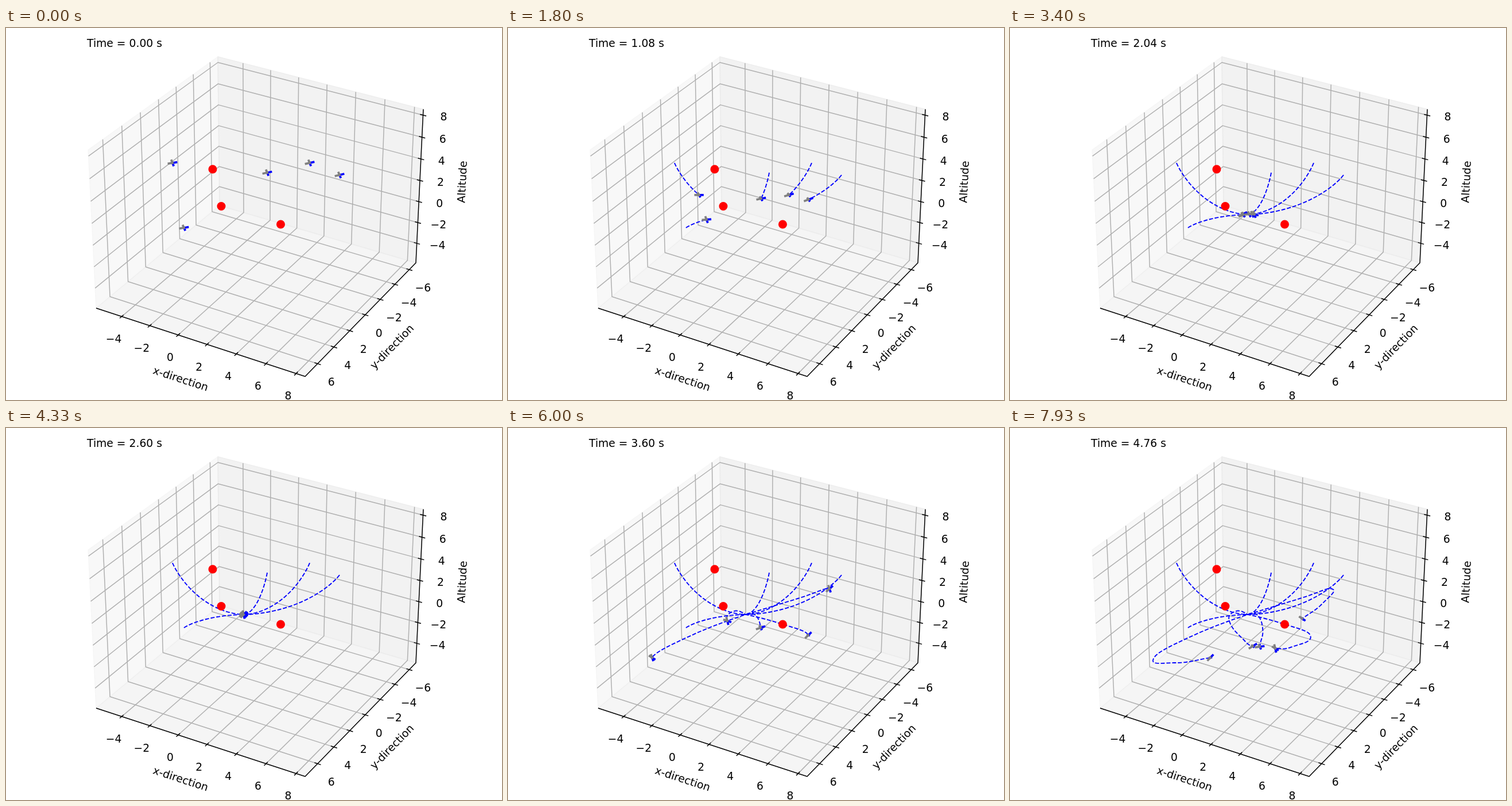
Write an HTML page with a canvas that moves like this. It is 864x648 px and loops after 8000 ms.

```html
<!DOCTYPE html>
<html>
<head>
<meta charset="utf-8">
<style>
html, body { margin: 0; width: 100%; height: 100%; overflow: hidden; background: #fff; }
canvas { display: block; }
</style>
</head>
<body>
<canvas id="stage" width="864" height="648"></canvas>
<script>
const ctx = document.getElementById('stage').getContext('2d');
const FONT = '18.75px "DejaVu Sans", sans-serif';
const LOOP = 8000, FRAMES = 120, STEP = 0.04;

// Perspective box: u along x, v along y, w along altitude, each 0..1.
// Corners are homogeneous: [x, y, weight].
const corner = (x, y, k) => [x * k, y * k, k];
const O = corner(372, 309.2, 1), U = corner(714, 409, 0.954),
      V = corner(157, 488, 0.915), W = corner(369, 50, 0.957);

function project([u, v, w]) {
  const [x, y, k] = O.map((o, i) => o + u * (U[i] - o) + v * (V[i] - o) + w * (W[i] - o));
  return [x / k, y / k];
}

function path(points) {
  ctx.beginPath();
  points.forEach(p => ctx.lineTo(p[0], p[1]));
}

function line(points, color, width) {
  path(points);
  ctx.strokeStyle = color;
  ctx.lineWidth = width;
  ctx.stroke();
}

const box = points => points.map(project);

function pane(points, color) {
  path(box(points));
  ctx.closePath();
  ctx.fillStyle = ctx.strokeStyle = color;
  ctx.lineWidth = 1.5;
  ctx.fill();
  ctx.stroke();
}

function label(text, x, y, degrees = 0, drop = 6.9) {
  ctx.save();
  ctx.translate(x, y);
  ctx.rotate(degrees * Math.PI / 180);
  ctx.textAlign = 'center';
  ctx.fillStyle = '#000';
  ctx.fillText(text, 0, drop);
  ctx.restore();
}

const axes = [
  { first: -4, start: 0.128, offset: [-14, 38.6],
    grid: s => [[s, 1, 0], [s, 0, 0], [s, 0, 1]], tick: (s, e) => [s, 1 + e, 0] },
  { first: -6, start: 0.0655, offset: [24, 31.6],
    grid: s => [[1, s, 0], [0, s, 0], [0, s, 1]], tick: (s, e) => [1 + e, s, 0] },
  { first: -4, start: 0.132, offset: [36, 2.8],
    grid: s => [[0, 1, s], [0, 0, s], [1, 0, s]], tick: (s, e) => [1 + e, 0, s] }
];
const TICK_GAP = 0.1385;

function drawAxes() {
  pane([[0, 0, 0], [0, 1, 0], [0, 1, 1], [0, 0, 1]], 'rgba(242,242,242,.5)');
  pane([[0, 0, 0], [1, 0, 0], [1, 0, 1], [0, 0, 1]], 'rgba(230,230,230,.5)');
  pane([[0, 0, 0], [1, 0, 0], [1, 1, 0], [0, 1, 0]], 'rgba(236,236,236,.5)');
  for (const a of axes)
    for (let i = 0; i < 7; i++) line(box(a.grid(a.start + i * TICK_GAP)), '#b0b0b0', 1.5);
  line(box([[0, 1, 0], [1, 1, 0], [1, 0, 0], [1, 0, 1]]), '#000', 1.5);
  for (const a of axes) {
    for (let i = 0; i < 7; i++) {
      const s = a.start + i * TICK_GAP, value = a.first + 2 * i;
      const [x, y] = project(a.tick(s, 0));
      line(box([a.tick(s, -0.014), a.tick(s, 0.015)]), '#000', 1.5);
      label(String(value).replace('-', '\u2212'), x + a.offset[0], y + a.offset[1]);
    }
  }
  label('x-direction', 304.5, 610.5, 18.1, 7.1);
  label('y-direction', 673, 556, -45.7, 5.2);
  label('Altitude', 794, 268, -87.2, 7.1);
}

// All drones gather at HUB, then fly out through a few points of their own.
const HUB = [414, 325], GATHER = 2.6;
const TIMES = [GATHER, 3.12, 3.6, 4.28, 4.76];
const drones = [
  { start: [290, 235], out: [[472, 340], [523, 361], [489, 382], [462, 384]] },
  { start: [310, 348], out: [[505, 297], [560, 280], [543, 307], [509, 332]] },
  { start: [455, 252], out: [[430, 325], [440, 348], [436, 376], [435, 381]] },
  { start: [529, 235], out: [[394, 319], [382, 336], [410, 372], [423, 380]] },
  { start: [581, 256], out: [[320, 361], [251, 400], [291, 409], [349, 400]] }
];

const smoother = u => u * u * u * (u * (6 * u - 15) + 10);

// The vertical move runs ahead of the horizontal one, which bends the paths.
function gather(start, t) {
  const u = t / GATHER;
  const progress = [smoother(u), smoother(1 - (1 - u) ** 1.55)];
  return start.map((s, k) => s + (HUB[k] - s) * progress[k]);
}

function slope(way, i, k) {
  if (i === 0) return 0;
  const last = TIMES.length - 1, next = Math.min(i + 1, last);
  const tension = i < last ? 1.5 : 1;
  return tension * (way[next][k] - way[i - 1][k]) / (TIMES[next] - TIMES[i - 1]);
}

function flyOut(way, t) {
  let i = 0;
  while (i < TIMES.length - 2 && t > TIMES[i + 1]) i++;
  const h = TIMES[i + 1] - TIMES[i], s = (t - TIMES[i]) / h;
  return HUB.map((_, k) =>
    way[i][k] + (way[i + 1][k] - way[i][k]) * s * s * (3 - 2 * s) +
    h * s * (1 - s) * ((1 - s) * slope(way, i, k) - s * slope(way, i + 1, k)));
}

function position({ start, out }, time) {
  const t = Math.min(Math.max(time, 0), TIMES[TIMES.length - 1]);
  return t < GATHER ? gather(start, t) : flyOut([HUB, ...out], t);
}

const ARMS = [[6.5, -1.2], [1.6, 3.5]], ARM_LIFT = 4.4;

// Each arm dips towards the direction in which the drone accelerates.
function drawDrone(drone, t) {
  const d = 0.15;
  const [x, y] = position(drone, t);
  const before = position(drone, t - d), after = position(drone, t + d);
  const force = [x, y].map((p, k) => (before[k] + after[k] - 2 * p) / (d * d));
  const tips = ARMS.map(([ax, ay]) => {
    const push = (force[0] * ax + force[1] * ay) / Math.hypot(ax, ay);
    const tilt = 0.9 * Math.tanh(push / 180);
    return [ax * Math.cos(tilt), ay * Math.cos(tilt) + ARM_LIFT * Math.sin(tilt)];
  });
  ctx.lineCap = 'square';
  for (const [color, side] of [['#00f', 1], ['#808080', -1]])
    for (const [ax, ay] of tips)
      line([[x, y], [x + side * ax, y + side * ay]], color, 3.75);
  ctx.lineCap = 'butt';
}

function drawTrail(drone, frame) {
  ctx.setLineDash([6.94, 3]);
  line(Array.from({ length: frame + 1 }, (_, i) => position(drone, i * STEP)), '#00f', 1.875);
  ctx.setLineDash([]);
}

function draw(now) {
  const frame = Math.min(FRAMES - 1, Math.floor((now % LOOP + 4) * FRAMES / LOOP));
  const t = frame * STEP;
  ctx.fillStyle = '#fff';
  ctx.fillRect(0, 0, 864, 648);
  ctx.font = FONT;
  ctx.lineJoin = 'round';
  drawAxes();
  drones.forEach(drone => drawTrail(drone, frame));
  drones.forEach(drone => drawDrone(drone, t));
  ctx.fillStyle = '#f00';
  for (const [x, y] of [[360, 246], [375, 310.5], [478.5, 342]]) {
    ctx.beginPath();
    ctx.arc(x, y, 7.5, 0, 2 * Math.PI);
    ctx.fill();
  }
  ctx.fillStyle = '#000';
  ctx.textAlign = 'left';
  ctx.fillText(`Time = ${t.toFixed(2)} s`, 141, 32.6);
}

function tick() {
  draw(performance.now());
  requestAnimationFrame(tick);
}
tick();
</script>
</body>
</html>
```
